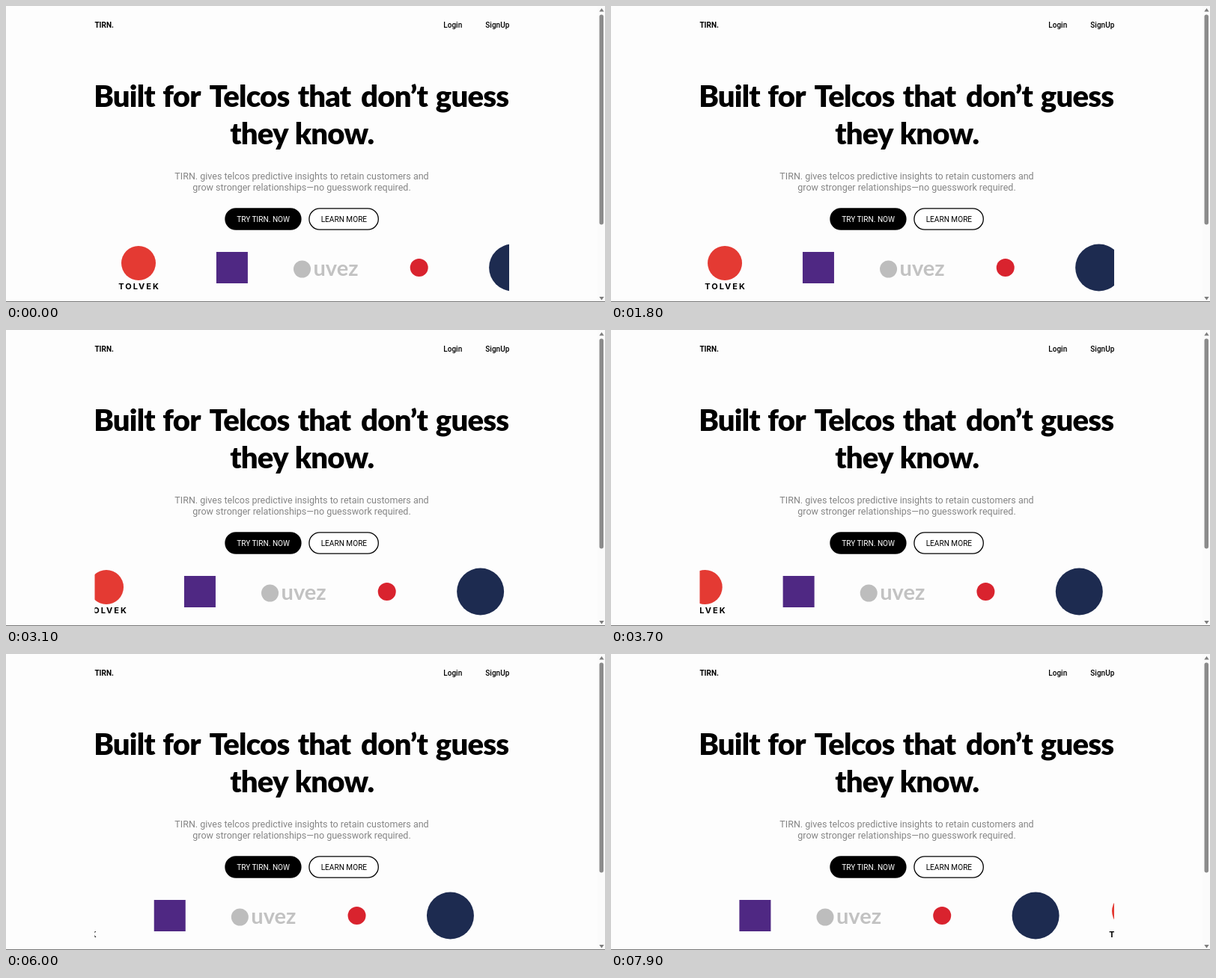
An HTML page that plays this animation: 800x396 px, repeating every 8000 ms.

```html
<!DOCTYPE html>
<html lang="en">
<head>
<meta charset="utf-8">
<title>Landing page</title>
<style>
  html, body { margin: 0; width: 100%; height: 100%; overflow: hidden; background: #fdfdfd; }
  svg { display: block; width: 800px; height: 396px; font-family: Roboto, sans-serif; }
  .mid { text-anchor: middle; }
  .nav { font-size: 10px; font-weight: 500; }
  .brand { font-size: 10px; font-weight: 700; }
  .title { font: 900 40px Lato, sans-serif; letter-spacing: -.8px; }
  .lead { font-size: 12.5px; fill: #858585; }
  .button { font-size: 10.1px; }
  .caption { font: 700 11px Inter, sans-serif; letter-spacing: 2px; }
  .wordmark { font: 700 29px Lato, sans-serif; fill: #c2c2c2; }
</style>
</head>
<body>
<svg viewBox="0 0 800 396">
  <defs>
    <clipPath id="window"><rect x="118.5" y="310" width="553.5" height="80"/></clipPath>
    <!-- Five partner logos, evenly spaced -->
    <g id="logos">
      <circle cy="344" r="23" fill="#e43a33"/>
      <text class="caption mid" x="1" y="379">TOLVEK</text>
      <rect x="103.9" y="329" width="42" height="42" fill="#4f2883"/>
      <circle cx="218.5" cy="352" r="11.5" fill="#bdbdbd"/>
      <text class="wordmark" x="233.5" y="361">uvez</text>
      <circle cx="374.7" cy="350" r="12" fill="#d9232e"/>
      <circle cx="499.6" cy="350" r="31.5" fill="#1d2b50"/>
    </g>
  </defs>

  <rect width="800" height="396" fill="#fdfdfd"/>

  <text class="brand" x="118.4" y="29">TIRN.</text>
  <text class="nav" x="584.3" y="29">Login</text>
  <text class="nav" x="640.3" y="29">SignUp</text>

  <g id="title" class="title mid"></g>

  <g class="lead mid">
    <text x="395" y="231.5">TIRN. gives telcos predictive insights to retain customers and</text>
    <text x="395" y="247">grow stronger relationships—no guesswork required.</text>
  </g>

  <g class="button mid">
    <rect x="292.3" y="270.3" width="102.3" height="29.4" rx="14.7"/>
    <text x="343.6" y="289" fill="#fff">TRY TIRN. NOW</text>
    <rect x="404.9" y="270.9" width="92.4" height="28.2" rx="14.1" fill="#fff" stroke="#000" stroke-width="1.3"/>
    <text x="451.4" y="289">LEARN MORE</text>
  </g>

  <g clip-path="url(#window)">
    <g id="track">
      <use href="#logos"/>
      <use href="#logos" x="624.5"/>
    </g>
  </g>

  <rect x="790" width="10" height="396" fill="#fbfbfb"/>
  <rect x="792.5" y="11.5" width="5.5" height="281" rx="2.75" fill="#8b8b8b"/>
  <path d="M792.3 7.5h6.4l-3.2-4.5zM792.3 389h6.4l-3.2 4.5z" fill="#7d7d7d"/>
  <rect y="395" width="800" height="1" fill="#777"/>
</svg>
<script>
  const LOOP = 8000;
  const STEP = 100;
  const START_X = 177;
  const SPEED = 13.86; // px per second

  // Headline words as [centre x, text]
  const lines = [
    { y: 135, words: [[158, "Built"], [234.5, "for"], [325, "Telcos"], [425, "that"], [518.5, "don’t"], [622.5, "guess"]] },
    { y: 184.5, words: [[338, "they"], [438.5, "know."]] }
  ];
  document.getElementById("title").innerHTML = lines.map(({ y, words }) =>
    words.map(([x, word]) => `<text x="${x}" y="${y}">${word}</text>`).join("")
  ).join("");

  const track = document.getElementById("track");

  function render(time) {
    const t = Math.floor((time % LOOP) / STEP) * STEP;
    const x = START_X - SPEED * t / 1000;
    track.setAttribute("transform", `translate(${x.toFixed(2)} 0)`);
  }

  const origin = performance.now();
  function tick() {
    render(performance.now() - origin);
    requestAnimationFrame(tick);
  }
  tick();
</script>
</body>
</html>
```
